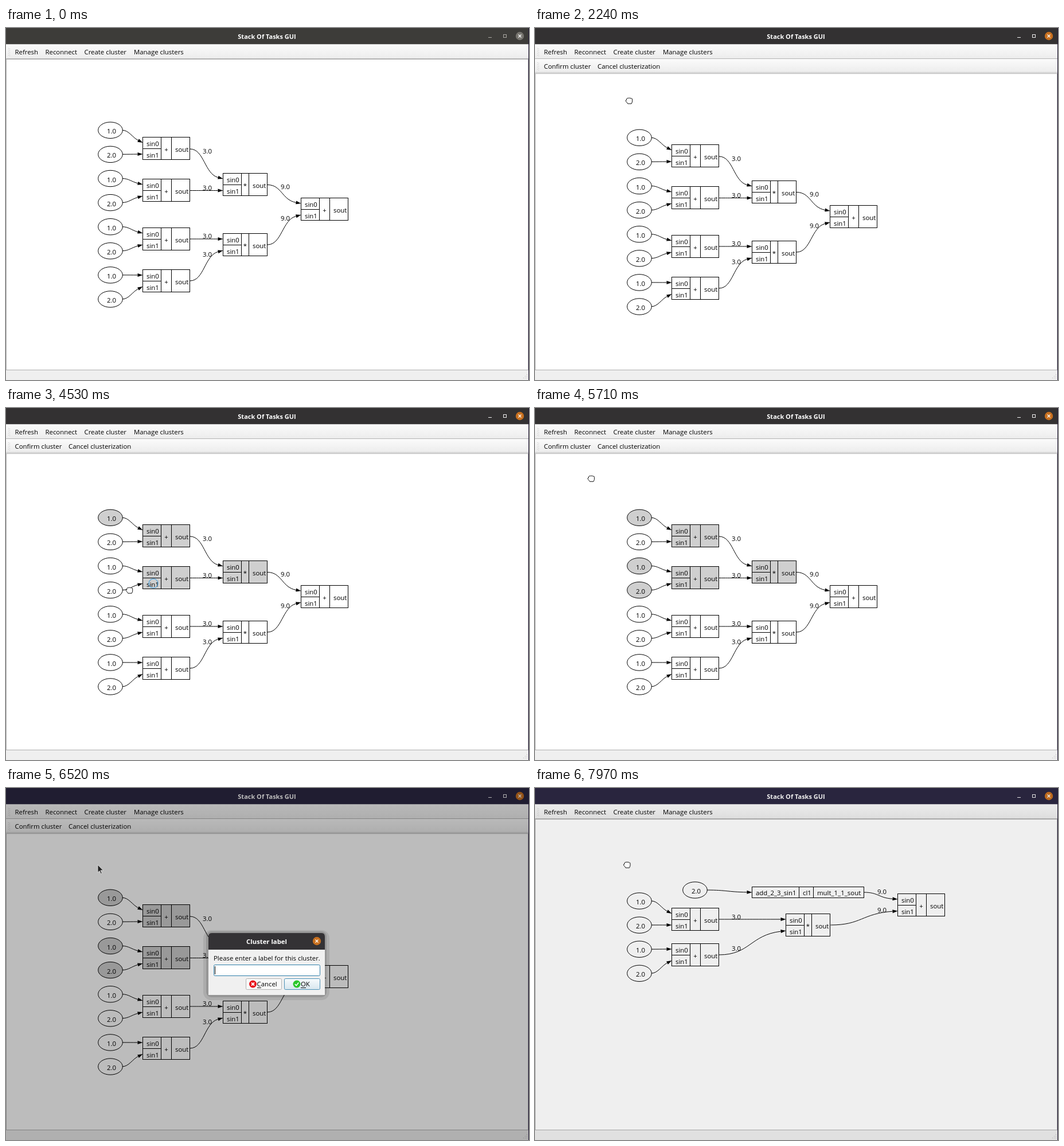
Animation of 912x614 px, one loop 8000 ms. Source, as an HTML page:

```html
<!DOCTYPE html>
<html lang="en">
<head>
<meta charset="utf-8">
<title>Stack Of Tasks GUI</title>
<style>
  html, body { margin: 0; width: 100%; height: 100%; overflow: hidden; background: #fff; }
  svg { display: block; width: 912px; height: 614px; font: 11.4px "Open Sans", "Noto Sans", sans-serif; }
  text { fill: #000; white-space: pre; }
  .title { font-weight: 700; font-size: 11px; fill: #fff; text-anchor: middle; }
  .node { fill: #fff; stroke: #000; }
  .edge { fill: none; stroke: #000; }
  .crisp { shape-rendering: crispEdges; }
  .hover { fill: #f8f8f8; stroke: #b4b4b4; }
  .mid { text-anchor: middle; }
</style>
</head>
<body>
<svg id="stage" viewBox="0 0 912 614">
  <defs>
    <linearGradient id="bar" x2="0" y2="1"><stop stop-color="#fbfbfb"/><stop offset="1" stop-color="#ececec"/></linearGradient>
    <linearGradient id="blue" x2="0" y2="1"><stop stop-color="#f7fbfd"/><stop offset="1" stop-color="#d8e6ee"/></linearGradient>
  </defs>
  <rect width="912" height="614" fill="#1d1430"/>
  <rect width="911" height="614" fill="#efefef"/>
  <rect id="titlebar" width="911" height="28.5"/>
  <text class="title" x="455" y="18.5">Stack Of Tasks GUI</text>
  <g id="buttons" fill="none">
    <path class="crisp" d="M841 16.5h6M867.5 11.5h5v5h-5z"/>
  </g>
  <g id="winClose"></g>

  <rect y="28.5" width="911" height="25" fill="url(#bar)"/>
  <rect id="hoverCreate" class="hover" x="131.5" y="32.5" width="85" height="19" rx="2"/>
  <text x="15.5" y="46">Refresh</text><text x="68.5" y="46">Reconnect</text>
  <text x="136.5" y="46">Create cluster</text><text x="223" y="46">Manage clusters</text>
  <path d="M4.5 35v13M6.5 36v13" stroke="#c4c4c4" stroke-dasharray="1 2"/>
  <path class="crisp" d="M0 53.5h911" stroke="#b4b4b4"/>

  <rect id="view" class="crisp" x=".5" width="910" fill="#fff" stroke="#b0b0b0"/>
  <g id="clusterBar">
    <rect y="54" width="911" height="24" fill="url(#bar)"/>
    <rect id="hoverConfirm" class="hover" x="10.5" y="57.5" width="92" height="19" rx="2"/>
    <text x="15.5" y="71">Confirm cluster</text><text x="109" y="71">Cancel clusterization</text>
    <path d="M4.5 60v13M6.5 61v13" stroke="#c4c4c4" stroke-dasharray="1 2"/>
    <path class="crisp" d="M0 77.5h911" stroke="#c4c4c4"/>
  </g>
  <path d="M908.5 604v8M905.5 607v5M902.5 610v2" stroke="#b4b4b4" stroke-dasharray="1 2"/>

  <g id="before"></g>
  <g id="after"></g>
  <rect id="dim" width="911" height="614"/>

  <g id="dialog">
    <rect id="halo" opacity=".085"/>
    <rect id="haloInner" x="349" y="250" width="210" height="115" rx="9" opacity=".13"/>
    <path d="M353 282v-23q0-6 6-6h191q6 0 6 6v23z" fill="#343235"/>
    <text class="title" x="454.5" y="271.5" style="font-size:11.3px">Cluster label</text>
    <g id="dlgClose"></g>
    <rect x="353" y="282" width="203" height="79" fill="#f0f0f0"/>
    <text x="362" y="301">Please enter a label for this cluster.</text>
    <rect x="362.5" y="308.5" width="185" height="19" rx="2" fill="#fff" stroke="#2f7fa9"/>
    <text id="typed" x="364.5" y="322"></text>
    <path id="caret" class="crisp" d="M0 311v14" stroke="#000"/>
    <rect x="418.5" y="332.5" width="62" height="19" rx="2" fill="#f8f8f8" stroke="#b2b2b2"/>
    <circle cx="430.5" cy="342" r="6.5" fill="#e8141c"/>
    <path d="M428 339.5l5 5m0-5l-5 5" stroke="#fff" stroke-width="1.8"/>
    <text x="437.5" y="346">Cancel</text>
    <rect x="485.5" y="332.5" width="62" height="19" rx="2" fill="url(#blue)" stroke="#4c91b6"/>
    <circle cx="507" cy="342" r="6.5" fill="#2bc72b"/>
    <path d="M503.8 342l2.4 2.5 4-5" fill="none" stroke="#fff" stroke-width="1.6"/>
    <text x="514" y="346">OK</text>
    <path class="crisp" d="M438 348.5h7M514 348.5h9" stroke="#000"/>
  </g>

  <circle id="ring" fill="none" stroke="#3d9fe0" stroke-width="1.2"/>
  <g id="cursor">
    <path id="hand" fill="#fff" stroke="#111" stroke-linejoin="round"
      d="M-4-3q1-2.500 3-1.300q1.300-1.500 3 0q1.500-1 2.500.5q1.800-.2 1.500 2v3q-.3 2-1.500 4h-6.500q-1-2-3-4q-1.700-2.400 1-2.200z"/>
    <path id="arrow" d="M0 0v13.500l3.100-2.900 2.200 5 2-.9-2.200-4.900h4.400z" fill="#222" stroke="#eee" stroke-width=".8"/>
  </g>
</svg>
<script>
const LOOP = 8000;
const $ = id => document.getElementById(id);
const show = (id, on) => { $(id).style.display = on ? '' : 'none'; };
const set = (id, attrs) => { for (const k in attrs) $(id).setAttribute(k, attrs[k]); };
const label = (x, y, s, cls = '') => `<text x="${x}" y="${y}" class="${cls}">${s}</text>`;

const oval = (id, cx, cy, s) =>
  `<ellipse id="${id}" class="node" cx="${cx}" cy="${cy}" rx="21.3" ry="14.200"/>` + label(cx + 2, cy + 6, s, 'mid');

// Two inputs, an operator and one output.
function operator(id, x, y, op) {
  const mid = x + 32, right = mid + (op === '*' ? 13 : 18), w = right - x + 32;
  return `<rect id="${id}" class="node crisp" x="${x}" y="${y}" width="${w}" height="39"/>` +
    `<path class="edge crisp" d="M${mid} ${y}v39M${right} ${y}v39M${x} ${y + 20}h32"/>` +
    label(x + 6.5, y + 15.5, 'sin0') + label(x + 6.5, y + 35, 'sin1') +
    label((mid + right) / 2, y + 25.5, op, 'mid') + label(right + 6.5, y + 25.5, 'sout');
}

// S-curve ending in an arrow head; short edges arrive more steeply.
function edge(x0, y0, x1, y1) {
  const dx = x1 - x0, short = dx < 40;
  const a = Math.atan2(y1 - y0, dx) * (short ? .85 : .35);
  const c = Math.cos(a), s = Math.sin(a);
  const bx = x1 - 9 * c, by = y1 - 9 * s;
  const k = (bx - x0) * (short ? .4 : .5);
  return `<path class="edge" d="M${x0} ${y0}C${x0 + k} ${y0} ${bx - k * c} ${by - k * s} ${bx} ${by}"/>` +
    `<path d="M${x1} ${y1}L${bx - 3 * s} ${by + 3 * c}L${bx + 3 * s} ${by - 3 * c}z"/>`;
}

function inputPair(name, ovalY, boxY) {
  return oval(name + 'a', 182, ovalY, '1.0') + oval(name + 'b', 182, ovalY + 42.1, '2.0') +
    operator(name, 238.5, boxY, '+') +
    edge(203, ovalY, 238.5, boxY + 9.5) + edge(203, ovalY + 42, 238.5, boxY + 29.5);
}

$('before').innerHTML =
  [190.5, 263.5, 348.5, 421.5].map((y, i) => inputPair('add' + i, 178.3 + 84.2 * i, y)).join('') +
  operator('mul0', 378.5, 253.5, '*') + operator('mul1', 378.5, 358.5, '*') +
  operator('sum', 514.5, 296.5, '+') +
  edge(321, 211, 378.5, 263) + edge(321, 283.5, 378.5, 283.5) +
  edge(321, 368, 378.5, 368) + edge(321, 441, 378.5, 388) +
  edge(456, 273.5, 514.5, 306) + edge(456, 378, 514.5, 326) +
  [219, 283, 367, 398.5].map(y => label(343, y, '3.0')).join('') +
  label(479, 281, '9.0') + label(479, 336, '9.0');

$('after').innerHTML =
  inputPair('left0', 197, 209.5) + inputPair('left1', 281.2, 271.5) +
  oval('loose', 279, 178, '2.0') + operator('product', 437.5, 219.5, '*') + operator('total', 632.5, 184.5, '+') +
  '<rect class="node crisp" x="378.5" y="172.5" width="195" height="19"/>' +
  '<path class="edge crisp" d="M460.5 172.500v19M485.500 172.500v19"/>' +
  label(385, 187, 'add_2_3_sin1') + label(467, 187, 'cl1') + label(492, 187, 'mult_1_1_sout') +
  edge(300, 178, 378.5, 182) + edge(321, 229, 437.5, 229) + edge(321, 291, 437.5, 249) +
  edge(574, 182, 632.5, 194) + edge(515.5, 239, 632.5, 214.5) +
  label(343, 229, '3.0') + label(343, 284, '3.0') + label(597, 185, '9.0') + label(597, 217, '9.0');

const closeButton = (x, y) => `<circle cx="${x}" cy="${y}" r="7.2" fill="#c8701f"/>` +
  `<path d="M${x - 2.5} ${y - 2.5}l5 5m0-5l-5 5" stroke="#fff" stroke-width="1.2"/>`;
$('winClose').innerHTML = closeButton(896, 14);
$('dlgClose').innerHTML = closeButton(542, 267);
const winDisc = $('winClose').firstChild;

const OPEN = 1800, ASK = 6200, DONE = 7760;
// time, x, y
const path = [
  [590, 319, 596], [800, 281, 430], [1050, 217, 190], [1180, 192, 110], [1300, 175, 69], [1390, 146, 57],
  [1430, 146, 51], [1510, 147, 48], [1950, 147, 48], [2150, 155, 95], [2350, 174, 165], [2510, 183, 192],
  [2800, 183, 192], [3000, 192, 234], [3390, 192, 234], [3620, 262, 226], [3740, 266, 228],
  [3960, 400, 305], [4080, 432, 299], [4200, 432, 299], [4370, 257, 306], [4430, 255, 307],
  [4530, 215, 318], [4640, 185, 318], [5010, 185, 318], [5150, 182, 277], [5400, 182, 277],
  [5790, 76, 84], [5840, 72, 75], [6170, 72, 75], [6330, 136, 119], [6520, 160, 134]
];
const clicks = [
  [1750, 147, 48], [2710, 183, 192], [3660, 264, 227], [4080, 432, 299],
  [4370, 257, 306], [4690, 185, 318], [5210, 182, 277], [6050, 72, 75]
];
const selected = { add0a: 2750, add0: 3700, mul0: 4120, add1: 4410, add1b: 4730, add1a: 5250 };

const ramp = (t, a, b) => Math.min(1, Math.max(0, (t - a) / (b - a)));

function position(t) {
  const i = path.findIndex(p => p[0] > t);
  if (i < 0) return path[path.length - 1].slice(1);
  if (i === 0) return path[0].slice(1);
  const [a, b] = [path[i - 1], path[i]], u = ramp(t, a[0], b[0]);
  return [a[1] + (b[1] - a[1]) * u, a[2] + (b[2] - a[2]) * u];
}

function render(t) {
  const active = t >= OPEN, clustering = active && t < DONE, asking = t >= ASK && t < DONE;
  const dimmed = t >= ASK, top = clustering ? 79.5 : 54.5;

  set('titlebar', { fill: dimmed ? '#2c2742' : active ? '#333132' : '#3d3c39' });
  set('buttons', { stroke: active ? '#f0f0f0' : '#aaa8a2' });
  winDisc.setAttribute('fill', active ? '#c8701f' : '#77756f');
  set('view', { y: top, height: 596.5 - top });
  show('clusterBar', clustering);
  show('before', t < DONE);
  show('after', t >= DONE);
  set('before', { transform: `translate(0 ${clustering ? 13 : 0})` });
  for (const id in selected) $(id).style.fill = t >= selected[id] ? '#cfcfcf' : '#fff';

  const dim = t < DONE ? .262 * ramp(t, 6190, 6520) : .262 - .262 * ramp(t, DONE, 8036);
  set('dim', { opacity: dim });

  show('dialog', asking);
  $('dialog').style.opacity = ramp(t, 6170, 6290);
  const settled = t >= 6430;
  set('halo', settled
    ? { x: 344, y: 248, width: 220, height: 122, rx: 14 }
    : { x: 338, y: 240, width: 234, height: 138, rx: 18 });
  show('haloInner', settled);
  const count = [7100, 7250, 7500].filter(k => t >= k).length;
  $('typed').textContent = 'cl1'.slice(0, count);
  set('caret', { transform: `translate(${[364.5, 370.5, 373.5, 380.5][count]} 0)` });

  const [x, y] = position(t);
  const pointer = y < (clustering ? 79 : 54) || asking;
  show('cursor', t >= 590);
  set('cursor', { transform: `translate(${x} ${y})` });
  show('hand', !pointer);
  show('arrow', pointer);
  show('hoverCreate', t >= 1430 && y < 53 && t < 2200);
  show('hoverConfirm', t >= 5840 && t < ASK);

  const click = clicks.find(c => t >= c[0] && t < c[0] + 300);
  show('ring', click);
  if (click) {
    const u = ramp(t, click[0], click[0] + 300);
    set('ring', { cx: click[1], cy: click[2], r: 4 + 5.5 * Math.sqrt(u), opacity: 1 - .3 * u });
  }
}

const start = performance.now();
function tick() {
  render((performance.now() - start) % LOOP);
  requestAnimationFrame(tick);
}
tick();
</script>
</body>
</html>
```
